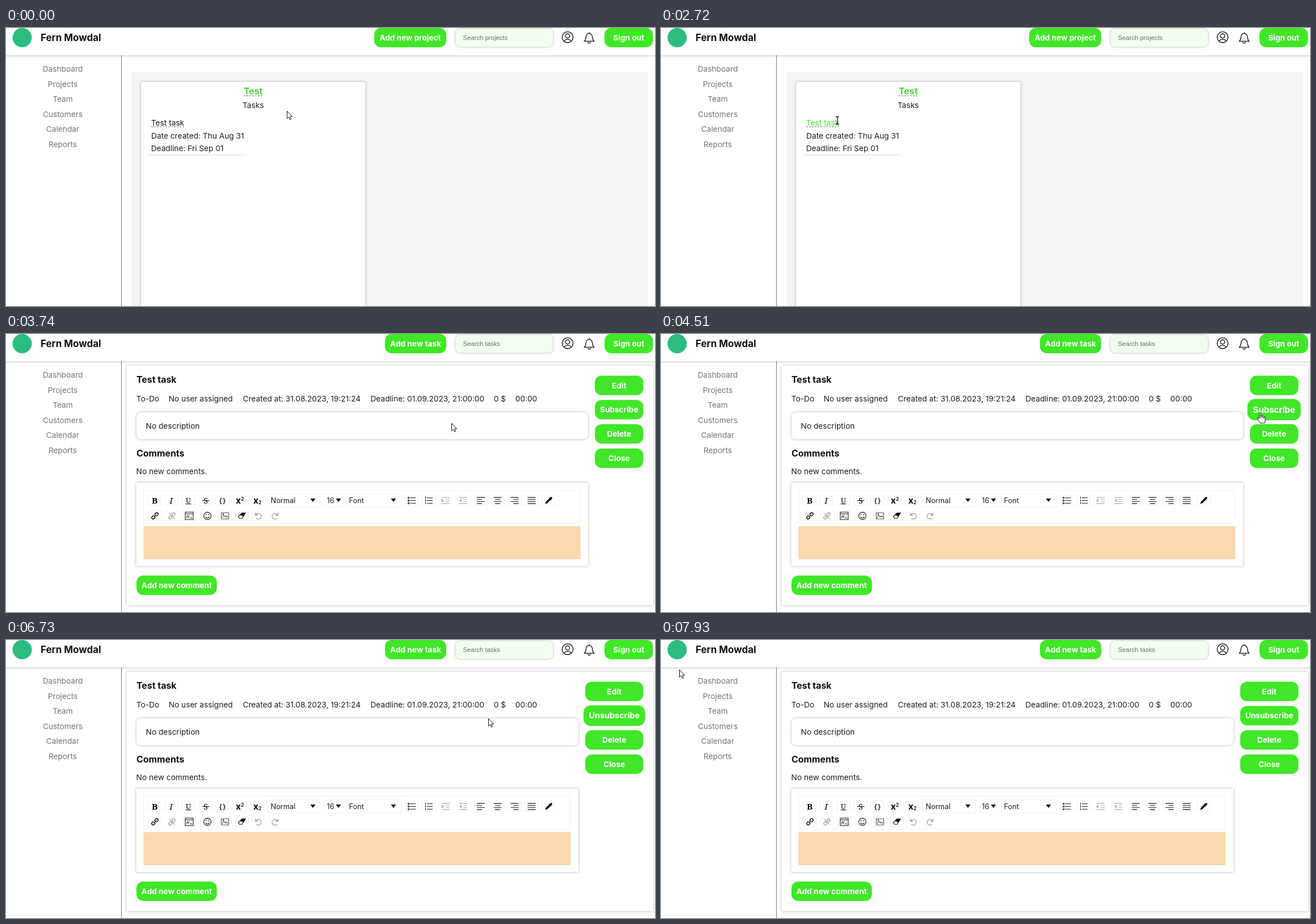
An HTML page that plays this animation: 1144 px wide and 490 px high, repeating every 8 s.

```html
<!DOCTYPE html>
<html lang="en">
<head>
<meta charset="utf-8">
<title>Task board</title>
<style>
  html, body { margin: 0; width: 100%; height: 100%; overflow: hidden; background: #fff; }
  svg { display: block; width: 100vw; height: 100vh; }
  text { font: 400 13.7px Inter, sans-serif; fill: #1c1c1c; text-anchor: middle; white-space: pre; }
  .left { text-anchor: start; }
  .head { font-size: 15.9px; font-weight: 700; fill: #111; }
  .brand { font-size: 17px; font-weight: 700; fill: #111; }
  .btn { font-size: 13.6px; font-weight: 700; fill: #fff; }
  .nav { fill: #747474; }
  .search { font: 11.33px "Liberation Sans", Arial, sans-serif; fill: #6b6b6b; text-anchor: start; }
  .tool { font-size: 12.8px; }
  .serif { font: 700 15px "Noto Serif", serif; fill: #000; }
  .box { fill: #fff; filter: drop-shadow(0 0 2px rgba(0, 0, 0, .3)); }
  .dash { stroke: #666; stroke-dasharray: 3 2; }
  .edge { fill: none; stroke: #f1f1f1; }
  .line { fill: none; stroke: #111; stroke-width: 1.1; }
</style>
</head>
<body>
<svg id="stage" viewBox="0 0 1144 490"></svg>
<script>
const GREEN = '#41e629';
const text = (x, y, str, cls = '', extra = '') => `<text x="${x}" y="${y}" class="${cls}" ${extra}>${str}</text>`;
const rect = (x, y, w, h, extra = '') => `<rect x="${x}" y="${y}" width="${w}" height="${h}" ${extra}/>`;
const line = (d, extra = '') => `<path class="line" d="${d}" ${extra}/>`;
const solid = (d, fill = '#111') => `<path d="${d}" fill="${fill}"/>`;
const button = (x, y, w, label, id = '') =>
  `<g id="${id}">${rect(x, y, w, 34.2, `rx="12" fill="${GREEN}"`)}${text(x + w / 2, y + 22, label, 'btn')}</g>`;

const topTools = (addX, noun) =>
  button(addX, -0.2, 776 - addX, 'Add new ' + noun) + text(805.5, 21, `Search ${noun}${noun === 'task' ? 's' : 's'}`, 'search');

const header = () => rect(-10, -10, 1164, 58, 'fill="#fff" style="filter:drop-shadow(0 1px 2px rgba(0,0,0,.22))"')
  + '<circle cx="28.5" cy="17" r="17" fill="#2bbd80"/>' + text(61, 23, 'Fern Mowdal', 'brand left')
  + rect(792.5, 2, 171.5, 31, 'rx="8" style="fill:#f1fdef" class="box"')
  + `<g transform="translate(990 16.2)">${line('M-6.3 7.3C-4.5 2.8 4.5 2.8 6.3 7.3', 'stroke-width="1.5"')}
     <circle class="line" r="9.6" style="stroke-width:1.4"/><circle class="line" cy="-2.2" r="3.7" style="stroke-width:1.4"/></g>`
  + line('M1019.5 23.4H1036.5C1034 21 1034 18 1033.5 15C1033 11.5 1031 9.7 1028 9.7S1023 11.5 1022.5 15C1022 18 1022 21 1019.5 23.4ZM1028 9.5V7.2M1025.6 24.5C1026 27.6 1030 27.6 1030.4 24.5', 'style="stroke-width:1.3"')
  + button(1055, -0.2, 85.5, 'Sign out');

const sidebar = () => rect(203, 48, 1, 442, 'fill="#777"')
  + ['Dashboard', 'Projects', 'Team', 'Customers', 'Calendar', 'Reports']
    .map((name, i) => text(100, 77 + i * 26.5, name, 'nav')).join('');

const projectsPage = () => rect(221, 78, 911, 412, 'fill="#f4f4f4"')
  + rect(238, 95, 395.5, 420, 'rx="4" class="box"')
  + text(435.7, 116.5, 'Test', 'head', 'style="fill:#4bd936"') + line('M419 119.5H453', 'style="stroke:#666;stroke-dasharray:3 2"')
  + text(435.7, 141, 'Tasks')
  + text(285, 172, 'Test task', '', 'id="taskLink"') + line('M256 174H315', 'style="stroke:#666;stroke-dasharray:3 2"')
  + text(337.8, 195, 'Date created: Thu Aug 31') + text(319.6, 217, 'Deadline: Fri Sep 01')
  + rect(251, 223, 173, 1, 'fill="#ddd"');

const icon = (x, y, art, faded) =>
  `<g transform="translate(${x} ${y})" opacity="${faded ? .35 : 1}">${rect(-11.5, -8.5, 23, 17, 'class="edge"')}${art}</g>`;
const glyph = (str, extra = '') => text(0, 5.3, str, 'serif', extra);
const script = (dy) => text(-2.5, 5, 'x', '', 'style="font-weight:800;font-size:15px"')
  + text(4.8, dy, '2', '', 'style="font-weight:700;font-size:8.5px"');
// Four or five rows, each given as [left, right]
const rows = (spans, gap = 3.6) => line(spans.map(([a, b], i) => `M${a} ${(i - (spans.length - 1) / 2) * gap}H${b}`).join(''));
const bullets = mark => rows([[-3, 7], [-3, 7], [-3, 7]], 4.7) + [-4.7, 0, 4.7].map(mark).join('');
const indent = arrow => rows([[-7, 7], [0, 7], [0, 7], [-7, 7]]) + solid(arrow);
const chain = `<g transform="rotate(-45)">${line('M-1 -2.4H-4.5A2.4 2.4 0 0 0 -4.5 2.4H-1M1 -2.4H4.5A2.4 2.4 0 0 1 4.5 2.4H1M-3 0H3', 'style="stroke-width:1.5"')}</g>`;
const turn = line('M-4.5 -1.5A5 5 0 1 1 -4 4', 'style="stroke-width:1.5"') + solid('M-6 -6V0H0Z');
const picker = (x, w, label, labelX, arrowX) => rect(x, 282, w, 23, 'class="edge"')
  + text(labelX, 298, label, 'tool left') + solid(`M${arrowX - 4.5} 290H${arrowX + 4.5}L${arrowX} 296Z`);

const toolbar = () => [
  icon(262, 293.5, glyph('B')),
  icon(291, 293.5, glyph('I', 'style="font-style:italic;font-weight:500"')),
  icon(321.5, 293.5, text(0, 4, 'U', 'serif', 'style="font-weight:400;font-size:12.5px"') + line('M-5 6H5')),
  icon(352, 293.5, glyph('S', 'style="font-weight:400;font-size:14px"') + line('M-6.5 0H6.5')),
  icon(381, 293.5, text(0, 4.3, '{ }', '', 'style="font-weight:600;font-size:12px;letter-spacing:-1px"')),
  icon(412, 293.5, script(0)), icon(443, 293.5, script(6)),
  picker(461, 93, 'Normal', 466.5, 541), picker(561, 33, '16', 565.5, 586), picker(600, 97, 'Font', 604.5, 683),
  icon(715.5, 293.5, bullets(y => `<circle class="line" cx="-5.8" cy="${y}" r="1.2"/>`)),
  icon(745, 293.5, bullets(y => line(`M-5.5 ${y - 1.8}V${y + 1.5}`))),
  icon(775, 293.5, indent('M-7 -3V3L-2.5 0Z'), true),
  icon(806, 293.5, indent('M-2.5 -3V3L-7 0Z'), true),
  icon(837, 293.5, rows([[-7, 7], [-7, 2], [-7, 7], [-7, 2]])),
  icon(866.5, 293.5, rows([[-7, 7], [-4.5, 4.5], [-7, 7], [-4.5, 4.5]])),
  icon(896.5, 293.5, rows([[-7, 7], [-2, 7], [-7, 7], [-2, 7]])),
  icon(926.5, 293.5, rows([[-7, 7], [-7, 7], [-7, 7], [-7, 7]])),
  icon(956.5, 293.5, solid('M-6 6L-4.7 2L1 -3.5L.2 -4.3L1.2 -5.2L2 -4.5L4 -6.4Q7 -6.5 6.3 -3.7L4.5 -2L5.2 -1.2L4.2 -.2L3.5 -1L-2.2 4.8Z')),
  icon(262.5, 320.5, chain),
  icon(292.5, 320.5, chain + line('M-5 -5L5 5'), true),
  icon(323, 320.5, line('M-7 -6.5H7V6.5H-7ZM-7 -3.5H7M-4.5 3.5L-3 -1M-1.8 3.5L-.3 -1M1 3.5H5')),
  icon(355, 320.5, '<circle class="line" r="6.4"/>' + line('M-3.3 1.5C-2 4.6 2 4.6 3.3 1.5M-2.3 -3V-1M2.3 -3V-1', 'style="stroke-width:1.4"')),
  icon(386, 320.5, `<g opacity=".75">${line('M-6.5 -5.5H6.5V5.5H-6.5ZM-5 3.5L-2 -1L1 2L3 0L5 3.5')}<circle class="line" cx="-3" cy="-2.8" r=".8"/></g>`),
  icon(416, 320.5, line('M-6.3 1L0 -5.2H6.3L0 4.5H-4.5Z') + solid('M-3.5 -1.5L0 -5.2H6.5L2.5 1Z')),
  icon(445, 320.5, turn, true),
  icon(474, 320.5, `<g transform="scale(-1 1)">${turn}</g>`, true)
].join('');

// shift narrows the left column to make room for a wider button column
const taskPage = (shift, label, id) => {
  const x = 1038 - shift, w = 85.5 + shift;
  return rect(212.5, 56, 928.5, 422, 'class="box"')
    + text(230, 86, 'Test task', 'head left')
    + [[250, 'To-Do'], [343.2, 'No user assigned'], [521.3, 'Created at: 31.08.2023, 19:21:24'],
       [742.8, 'Deadline: 01.09.2023, 21:00:00'], [870.5, '0 $'], [917, '00:00']]
      .map(([cx, str]) => text(cx, 119, str)).join('')
    + rect(230, 138, 796 - shift, 47.5, 'rx="8" class="box"') + text(294, 167, 'No description')
    + text(230, 215.5, 'Comments', 'head left') + text(292, 247, 'No new comments.')
    + rect(229.5, 262, 796.5 - shift, 147, 'class="box"')
    + rect(242.5, 275.5, 769.5 - shift, 58.5, 'class="edge"') + toolbar()
    + rect(242.5, 338.5, 770 - shift, 58.5, 'fill="#f9d8ae"')
    + button(230, 425.8, 141.7, 'Add new comment')
    + button(x, 73.5, w, 'Edit') + button(x, 159, w, 'Delete') + button(x, 201.8, w, 'Close')
    + button(x, 116.2, w, label, id);
};

const cursors = {
  arrow: '<path d="M.5 .5V13.6L3.5 10.9L5.6 15.4L7.7 14.5L5.7 10.1H9.7Z" fill="#fff" stroke="#111" stroke-linejoin="round"/>',
  beam: line('M-3 -6.5H-1L0 -5.7L1 -6.5H3M0 -5.7V5.7M-3 6.5H-1L0 5.7L1 6.5H3', 'style="stroke-width:1.4"'),
  hand: '<path d="M-1.2 11V1.5Q0 -.7 1.3 1.5V7Q2.7 5.5 4 7.2Q5.4 6 6.6 7.8Q8.6 7 9 9.4V14Q9 16.5 7.6 19H.3Q-1 16.5 -3.5 13.5Q-5.3 10.5 -3.8 9.6Q-2.4 9.3 -1.2 11ZM1.3 7V10.5M4 7.5V10.8M6.6 8V11" fill="#fff" stroke="#111" stroke-linejoin="round"/>'
};

const stage = document.getElementById('stage');
stage.innerHTML = `<g id="projects">${projectsPage()}</g>
  <g id="open">${taskPage(0, 'Subscribe', 'subscribe')}</g>
  <g id="subscribed">${taskPage(17, 'Unsubscribe', 'unsubscribe')}</g>
  ${sidebar()}${header()}
  <g id="projectTools">${topTools(649, 'project')}</g><g id="taskTools">${topTools(668, 'task')}</g>
  <circle id="click" r="10.5" fill="#ff0" fill-opacity=".47"/>
  ${Object.entries(cursors).map(([name, art]) => `<g id="${name}">${art}</g>`).join('')}`;

const el = id => document.getElementById(id);
const show = (id, on) => el(id).setAttribute('visibility', on ? 'visible' : 'hidden');
const between = (t, a, b) => t >= a && t < b;
const ease = (t, start, length) => 1 - (1 - Math.min(1, Math.max(0, (t - start) / length))) ** 2;

// [time, x, y] of the pointer's hot spot
const path = [
  [0, 495, 146], [1080, 495, 146], [1290, 478, 146], [1640, 362, 152], [1710, 318, 167], [1780, 264, 166],
  [1850, 290, 165], [1920, 311, 163], [3180, 311, 163], [3320, 430, 162], [3740, 785, 157], [3950, 941, 149],
  [4020, 985, 145], [4160, 1050, 139], [4230, 1056, 138], [6520, 1056, 138], [6590, 990, 140], [6730, 850, 138],
  [7010, 530, 125], [7360, 172, 80], [7430, 100, 62], [7570, 26, 48], [7850, 26, 48], [7920, 32, 52], [8000, 32, 52]
];
const pointer = t => {
  const i = path.findIndex(key => key[0] > t);
  const [t0, x0, y0] = path[i - 1], [t1, x1, y1] = path[i], p = (t - t0) / (t1 - t0);
  return [x0 + (x1 - x0) * p, y0 + (y1 - y0) * p];
};

function scale(id, cx, s) {
  el(id).setAttribute('transform', `translate(${cx} 133.3) scale(${s}) translate(${-cx} -133.3)`);
}

function draw(t) {
  const offset = t < 6000 ? 30 : 10;
  const tick = Math.max(0, Math.floor((t - offset) / 70) * 70 + offset);
  const [x, y] = pointer(tick).map(Math.round);
  const onTask = t >= 2790;

  show('projects', !onTask);
  show('projectTools', !onTask);
  show('taskTools', onTask);
  show('open', between(t, 2790, 5450));
  show('subscribed', t >= 5450);

  const green = ease(tick, 1850, 340), mix = (a, b) => Math.round(a + (b - a) * green);
  el('taskLink').style.fill = `rgb(${mix(28, 65)},${mix(28, 225)},${mix(28, 41)})`;
  scale('subscribe', 1080.75, 1 + .1 * ease(tick, 4160, 320));
  scale('unsubscribe', 1072.25, 1.1 - .1 * ease(tick, 6660, 300));

  const shape = between(t, 1780, 3180) ? 'beam' : between(t, 4160, 6590) ? 'hand' : 'arrow';
  for (const name in cursors) show(name, name === shape);
  el(shape).setAttribute('transform', `translate(${x} ${y})`);
  show('click', between(t, 2450, 2530) || between(t, 5040, 5240));
  el('click').setAttribute('transform', `translate(${x - .5} ${y - .5})`);
}

const start = performance.now();
function loop() {
  draw((performance.now() - start) % 8000);
  requestAnimationFrame(loop);
}
loop();
</script>
</body>
</html>
```
